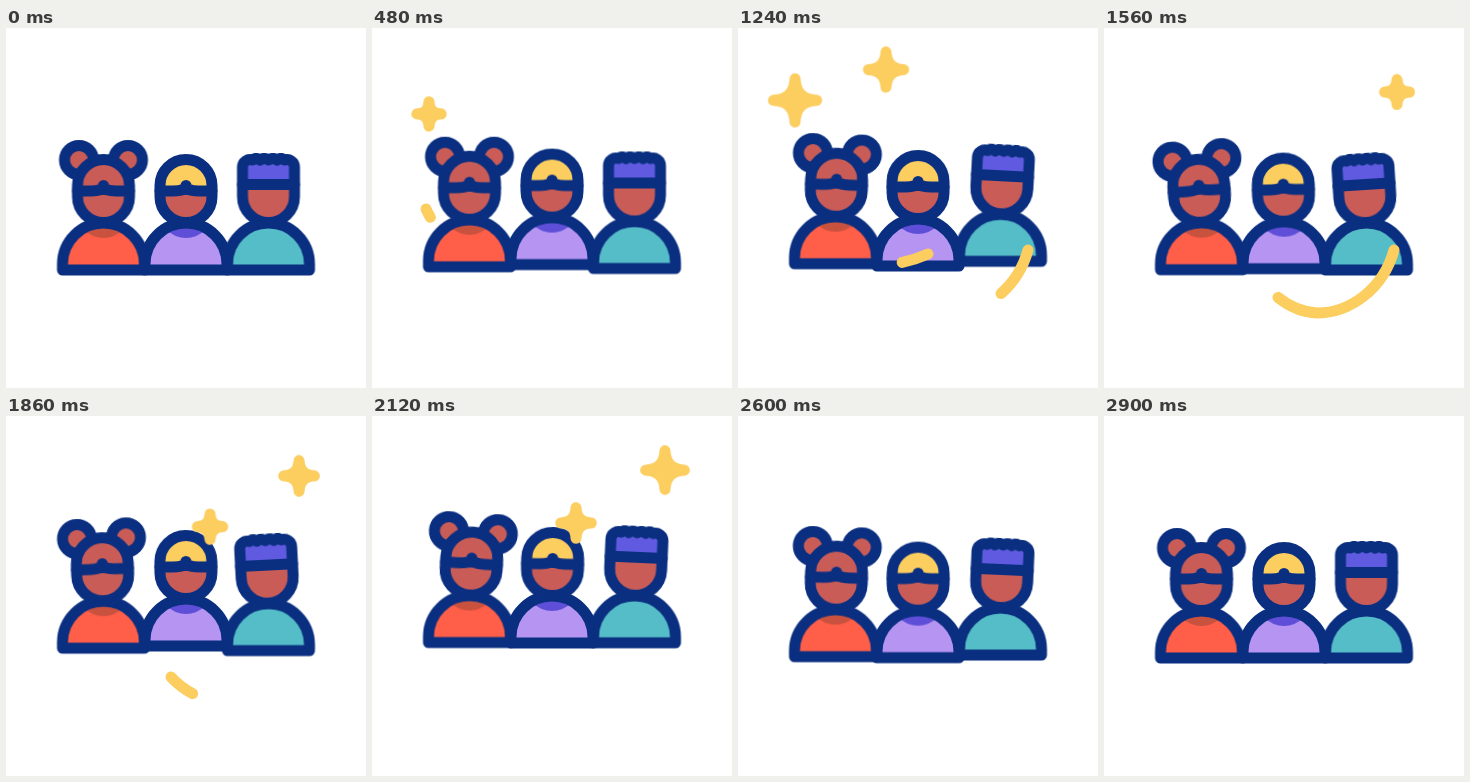
Recreate the animation shown at these times as an HTML page. Size 360 px wide and 360 px high, loop 3.04 s.

```html
<!DOCTYPE html>
<html lang="en">
<head>
<meta charset="utf-8">
<title>Jumping friends</title>
<style>
  html, body { margin: 0; width: 100%; height: 100%; overflow: hidden; background: #fff; }
  svg { display: block; width: 360px; height: 360px; }

  .ink { stroke: #0b2f80; stroke-width: 11; stroke-linecap: round; stroke-linejoin: round; }
  .line { fill: none; }
  .skin { fill: #c95c57; }

  .jump, .head, .star, .swoosh {
    animation-duration: 3040ms;
    animation-iteration-count: infinite;
    animation-fill-mode: both;
    animation-delay: var(--at, 0ms);
  }
  .jump { animation-name: jump; animation-timing-function: cubic-bezier(.37, 0, .63, 1); }
  .head {
    animation-name: tilt;
    animation-timing-function: cubic-bezier(.4, 0, .6, 1);
    transform-origin: 0 195px;
  }
  .star {
    animation-name: grow;
    fill: #fccd5f;
    stroke: #fccd5f;
    stroke-linejoin: round;
    vector-effect: non-scaling-stroke;
  }
  .swoosh {
    animation-name: sweep;
    animation-timing-function: linear;
    fill: none;
    stroke: #fccd5f;
    stroke-width: 11;
    stroke-linecap: round;
    stroke-dasharray: 1 2;
  }

  @keyframes jump {
    0%, 7.8%, 47.6%, 87.4%, 100% { transform: translateY(0); }
    27.7%, 67.5% { transform: translateY(-15.5px); }
  }
  @keyframes tilt {
    0%, 13.2%, 90.5%, 100% { transform: rotate(0deg); }
    30.6%, 73.4% { transform: rotate(var(--tilt)); }
    51.3% { transform: rotate(calc(var(--tilt) * -.9)); }
  }
  @keyframes grow {
    0% { transform: translateY(0) scale(0); stroke-width: 0; visibility: visible; }
    2.4% {
      transform: translateY(0) scale(.54); stroke-width: 11px;
      animation-timing-function: cubic-bezier(.4, .1, .75, .7);
    }
    29.6% { transform: translateY(-15px) scale(1); stroke-width: 11px; visibility: visible; }
    29.61%, 100% { transform: translateY(-15px) scale(0); stroke-width: 0; visibility: hidden; }
  }
  @keyframes sweep {
    0% { stroke-dashoffset: 1.02; }
    17.8% { stroke-dashoffset: 0; }
    28.3%, 100% { stroke-dashoffset: -1.02; }
  }
</style>
</head>
<body>
<svg viewBox="0 0 360 360">
  <defs>
    <path id="body" d="M-41 242V236a41 41 0 0 1 82 0V242Z"/>
    <path id="face" d="M-26 157.5a26 26 0 0 1 52 0V168.5a26 26 0 0 1-52 0Z"/>
    <path id="quiff" d="M-26 168.5V139a7.5 7.5 0 0 1 10-7q3.5-3 7.5 0q4-3 8.5 0q4.500-3 8.500 0q4-3 7.500 0a7.500 7.500 0 0 1 10 7V168.500a26 26 0 0 1-52 0Z"/>
    <path id="fringe" d="M-26 163H-13Q0 163 0 157.500Q0 163 13 163H26"/>
    <path id="spark" d="M0-22.500Q1-1 22.500 0Q1 1 0 22.500Q-1 1-22.500 0Q-1-1 0-22.500Z"/>
    <clipPath id="inBody"><use href="#body"/></clipPath>
    <clipPath id="inFace"><use href="#face"/></clipPath>
    <clipPath id="inQuiff"><use href="#quiff"/></clipPath>
  </defs>

  <g transform="translate(97.5 0)">
    <g class="jump" style="--at:60ms">
      <use href="#body" fill="#ff5f48"/>
      <circle cy="183" r="27" fill="#c9523f" clip-path="url(#inBody)"/>
      <use href="#body" class="ink line"/>
      <g class="head" style="--tilt:4.8deg">
        <circle class="ink skin" cx="-24.500" cy="132" r="14.500"/>
        <circle class="ink skin" cx="24.500" cy="132" r="14.500"/>
        <use href="#face" class="ink skin"/>
        <use href="#fringe" class="ink line"/>
      </g>
    </g>
  </g>

  <g transform="translate(262.5 0)">
    <g class="jump" style="--at:120ms">
      <use href="#body" class="ink" fill="#55bdc8"/>
      <g class="head" style="--tilt:4.800deg">
        <use href="#quiff" class="skin"/>
        <path d="M-26 120H26V157H-26Z" fill="#5f5ae0" clip-path="url(#inQuiff)"/>
        <use href="#quiff" class="ink line"/>
        <path class="ink line" d="M-26 156.500H26"/>
      </g>
    </g>
  </g>

  <g transform="translate(180 0)">
    <g class="jump">
      <use href="#body" fill="#b594f2"/>
      <circle cy="183" r="27" fill="#5f4fd8" clip-path="url(#inBody)"/>
      <use href="#body" class="ink line"/>
      <g class="head" style="--tilt:1.200deg">
        <use href="#face" class="skin"/>
        <path d="M-26 125H26V163H-26Z" fill="#fccd5f" clip-path="url(#inFace)"/>
        <use href="#face" class="ink line"/>
        <use href="#fringe" class="ink line"/>
      </g>
    </g>
  </g>

  <path class="swoosh" style="--at:440ms" pathLength="1" d="M54 181C70 215 100 236 133 237C152 238 172 234 190 226"/>
  <path class="swoosh" style="--at:1060ms" pathLength="1" d="M290 222C279 262 245 285 213 285C195 284 178 275 165 261"/>

  <g transform="translate(57 86)"><path class="star" style="--at:400ms" d="M0-22.500Q1-1 22.500 0Q1 1 0 22.500Q-1 1-22.500 0Q-1-1 0-22.500Z"/></g>
  <g transform="translate(148 49.500)"><path class="star" style="--at:640ms" d="M0-22.500Q1-1 22.500 0Q1 1 0 22.500Q-1 1-22.500 0Q-1-1 0-22.500Z"/></g>
  <g transform="translate(293 64.500)"><path class="star" style="--at:1415ms" d="M0-22.500Q1-1 22.500 0Q1 1 0 22.500Q-1 1-22.500 0Q-1-1 0-22.500Z"/></g>
  <g transform="translate(204 111.500)"><path class="star" style="--at:1678ms" d="M0-22.500Q1-1 22.500 0Q1 1 0 22.500Q-1 1-22.500 0Q-1-1 0-22.500Z"/></g>
</svg>
</body>
</html>
```
